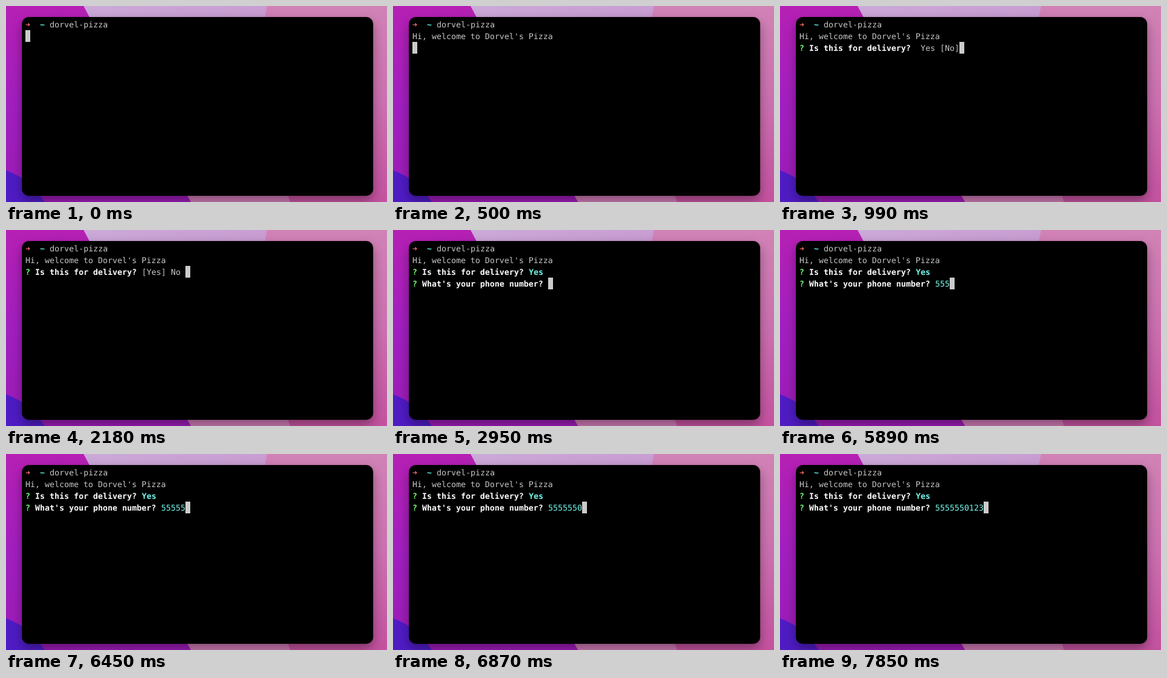
Write an HTML page that moves like this. It is 550 px wide and 284 px high and loops after 8 s.

```html
<!DOCTYPE html>
<html lang="en">
<head>
<meta charset="utf-8">
<title>Terminal pizza order</title>
<style>
  html, body { margin: 0; width: 100%; height: 100%; overflow: hidden; background: #a31fb8; }
  svg { display: block; position: absolute; left: 0; top: 0; }
  .window {
    position: absolute; left: 23px; top: 16px; width: 507px; height: 259px;
    border-radius: 10px; background: #000;
    box-shadow: 0 7px 16px rgba(0, 0, 0, .36), 0 0 1px rgba(0, 0, 0, .6);
  }
  text {
    font: 11.627px "DejaVu Sans Mono", monospace;
    text-rendering: geometricPrecision; white-space: pre; fill: #c7c7c7;
  }
  .arrow { fill: #ff6e67; font-weight: bold; }
  .tilde { fill: #60f5e6; font-weight: bold; }
  .mark { fill: #6dfa72; font-weight: bold; }
  .ask { fill: #fff; font-weight: bold; }
  .answer { fill: #74f8ec; }
  .chosen { fill: #74f8ec; font-weight: bold; }
  .cursor { fill: #cbcbc9; }
</style>
</head>
<body>
<svg width="550" height="284" viewBox="0 0 550 284">
  <defs>
    <linearGradient id="violet" x1="0" y1="0" x2="0" y2="1">
      <stop offset="0" stop-color="#b620b4"/>
      <stop offset=".5" stop-color="#a21fc0"/>
      <stop offset="1" stop-color="#9c1cb6"/>
    </linearGradient>
    <linearGradient id="lilac" x1="0" y1="0" x2=".3" y2="1">
      <stop offset="0" stop-color="#cbaad8"/>
      <stop offset=".45" stop-color="#c58ac8"/>
      <stop offset="1" stop-color="#cc7ab2"/>
    </linearGradient>
    <linearGradient id="rose" x1="0" y1="0" x2="0" y2="1">
      <stop offset="0" stop-color="#d182b6"/>
      <stop offset=".5" stop-color="#cc70b0"/>
      <stop offset="1" stop-color="#c4529f"/>
    </linearGradient>
  </defs>
  <path fill="url(#violet)" d="M0 0H550V284H0Z"/>
  <path fill="url(#lilac)" d="M112 0Q170 110 267 284H550V0Z"/>
  <path fill="url(#rose)" d="M377 0Q350 110 410 284H550V0Z"/>
  <path fill="#4f1cc4" d="M0 238Q34 250 56 284H0Z"/>
</svg>
<div class="window"></div>
<svg id="screen" width="550" height="284" viewBox="0 0 550 284"></svg>
<script>
const LOOP = 8000;
const LEFT = 28, TOP = 18, CELL = 7, LINE = 17, BASELINE = 13;
const PHONE = "5555550123";
const KEY_TIMES = [5120, 5330, 5610, 5960, 6240, 6520, 6870, 7150, 7500, 7850];

const escapeText = s => s.replace(/&/g, "&amp;").replace(/</g, "&lt;");
const put = (row, col, style, s) =>
  `<text x="${LEFT + col * CELL}" y="${TOP + row * LINE + BASELINE}" class="${style}">${escapeText(s)}</text>`;
const cursor = (row, col) =>
  `<rect x="${LEFT + col * CELL}" y="${TOP + row * LINE}" width="${CELL}" height="${LINE}" class="cursor"/>`;
const question = (row, s) => put(row, 0, "mark", "?") + put(row, 2, "ask", s);

const prompt = put(0, 0, "arrow", "➜") + put(0, 3, "tilde", "~") + put(0, 5, "", "dorvel-pizza");
const greeting = prompt + put(1, 0, "", "Hi, welcome to Dorvel's Pizza");
const delivery = greeting + question(2, "Is this for delivery?");

const choose = yes => delivery + cursor(2, 33) +
  (yes ? put(2, 24, "", "[Yes] No") : put(2, 25, "", "Yes [No]"));
const phone = count => delivery + put(2, 24, "chosen", "Yes") +
  question(3, "What's your phone number?") +
  put(3, 28, "answer", PHONE.slice(0, count)) + cursor(3, 28 + count);

const steps = [
  [0, prompt + cursor(1, 0)],
  [500, greeting + cursor(2, 0)],
  [990, choose(false)],
  [1760, choose(true)],
  [1970, choose(false)],
  [2180, choose(true)],
  [2950, phone(0)],
  ...KEY_TIMES.map((time, i) => [time, phone(i + 1)])
];

const screenView = document.getElementById("screen");
const start = performance.now();
let shown = -1;

function draw() {
  const time = (performance.now() - start) % LOOP;
  const current = steps.findLastIndex(([from]) => from <= time);
  if (current !== shown) {
    shown = current;
    screenView.innerHTML = steps[current][1];
  }
  requestAnimationFrame(draw);
}
draw();
</script>
</body>
</html>
```
